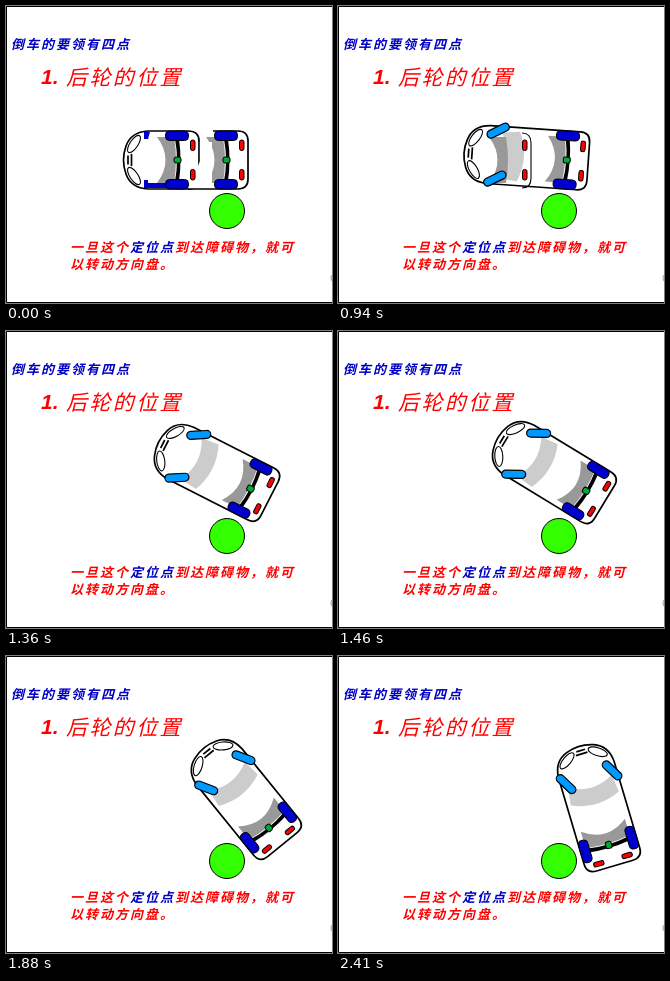
These frames come from a looping animation (326 by 297 pixels, 5410 ms). An HTML page:

```html
<!DOCTYPE html>
<html lang="zh-CN">
<head>
<meta charset="utf-8">
<style>
html, body { margin: 0; width: 100%; height: 100%; overflow: hidden; background: #fff; }
svg { display: block; width: 326px; height: 297px; }
text { font: italic bold 13px "Noto Sans CJK SC", "Noto Sans CJK", sans-serif; letter-spacing: 2px; fill: #f00; white-space: pre; }
.blue { fill: #0000c4; }
.head { font-size: 21px; font-weight: 500; letter-spacing: 2.4px; }
.num { font: italic bold 21px "Liberation Sans", sans-serif; letter-spacing: 0; }
.body { fill: #fff; stroke: #000; stroke-width: 1.7; }
.line { fill: none; stroke: #000; stroke-width: 1.7; }
.thin { stroke-width: 1.1; }
.wheel { fill: #0000cc; stroke: #000; }
.steer { fill: #0099ff; stroke: #000; stroke-width: 1.2; }
.lamp { fill: #f00; stroke: #000; }
</style>
</head>
<body>
<svg viewBox="0 0 326 297">
  <defs>
    <g id="lamps">
      <rect class="lamp" x="13.5" y="-20" width="4.5" height="10.5" rx="2"/>
      <rect class="lamp" x="13.5" y="9.5" width="4.5" height="10.5" rx="2"/>
    </g>
    <path id="pane" d="M-20-23Q-3 0-20 23H-3Q1 0-3-23Z" fill="#999"/>
    <g id="rear">
      <use href="#pane"/>
      <path d="M-2-21Q2 0-2 21H2Q5 0 2-21Z"/>
      <rect x="-3" y="-3" width="7" height="6" rx="2" fill="#0a3" stroke="#000"/>
      <rect class="wheel" x="-11.5" y="-29" width="23" height="9.5" rx="4"/>
      <rect class="wheel" x="-11.5" y="19.5" width="23" height="9.5" rx="4"/>
      <use href="#lamps"/>
    </g>
    <g id="nose">
      <ellipse class="body thin" rx="10" ry="4" transform="translate(-92 -16) rotate(-56)"/>
      <ellipse class="body thin" rx="10" ry="4" transform="translate(-92 16) rotate(56)"/>
      <path class="line" d="M-98-4.5V4.5M-94.5-6V6"/>
    </g>
  </defs>

  <path d="M326 .5H.5V296.5H326" fill="none" stroke="#000"/>
  <circle cx="330" cy="272" r="5" fill="none" stroke="#999"/>
  <text class="blue" x="5" y="43">倒车的要领有四点</text>
  <text class="num" x="35" y="78">1.</text>
  <text class="head" x="60" y="79">后轮的位置</text>
  <text x="64" y="246">一旦这个<tspan class="blue">定位点</tspan>到达障碍物，就可</text>
  <text x="64" y="263">以转动方向盘。</text>
  <circle cx="221" cy="205" r="17.5" fill="#3f0" stroke="#000"/>

  <g id="parked">
    <g transform="translate(220 154)">
      <path class="body" d="M-38-29Q-27-29-27-19V19Q-27 29-38 29H-78Q-95 28-100 14Q-105 0-100-14Q-95-28-78-29Z"/>
      <path class="body" d="M-13-29H12Q22-29 22-19V19Q22 29 12 29H-38"/>
      <path d="M-82-28h6l-2 7h-4zM-82 28h22v-5h-18v-3h-4z" fill="#0000cc"/>
      <use href="#nose"/>
      <use href="#rear"/>
    </g>
    <use href="#rear" x="171" y="154"/>
    <path d="M193.9 136H206V182H193.9Z" fill="#fff"/>
    <path id="glass" d="M163 131Q177 154 163 177H169Q183 154 169 131Z" fill="#ccc"/>
    <circle id="dot" cx="220" cy="178" r="4.5" fill="#ffec00" stroke="#660" stroke-width=".8"/>
  </g>

  <g class="car">
    <path class="body" d="M12-29Q22-29 22-19V19Q22 29 12 29H-78Q-95 28-100 14Q-105 0-100-14Q-95-28-78-29Z"/>
    <path d="M-66-23Q-53 0-66 23L-48 25Q-37 0-48-25Z" fill="#ccc"/>
    <use href="#nose"/>
    <use href="#rear"/>
  </g>
  <g id="trail">
    <use href="#pane" x="171" y="154"/>
    <use href="#lamps" x="171" y="154"/>
    <path class="line thin" d="M184 127Q193 127 193 137V172Q193 182 184 182"/>
  </g>
  <g class="car">
    <rect class="steer" x="-12" y="-4" width="24" height="8" rx="4" transform="translate(-70 -24.5) rotate(-30)"/>
    <rect class="steer" x="-12" y="-4" width="24" height="8" rx="4" transform="translate(-70 23.5) rotate(-30)"/>
  </g>
</svg>
<script>
const LOOP = 5410;
const steps = [0, 100, 200, 310, 420, 530, 730, 940, 1050, 1150, 1260, 1360, 1460,
  1560, 1670, 1770, 1880, 1980, 2080, 2190, 2300, 2410];
// time, rear axle x, y, heading
const poses = [
  [730, 224.5, 154, 0], [940, 228.3, 154, 4], [1360, 244, 157.5, 27],
  [1670, 255.5, 164, 40.4], [1880, 262.5, 171.5, 51], [2410, 270.5, 188.5, 73.5]
];
const $ = id => document.getElementById(id);
const cars = document.querySelectorAll(".car");
const show = (el, on) => el.setAttribute("visibility", on ? "visible" : "hidden");

function poseAt(t) {
  const i = Math.max(1, poses.findIndex(p => p[0] >= t));
  const a = poses[i - 1], b = poses[i];
  const k = Math.max(0, (t - a[0]) / (b[0] - a[0]));
  return a.map((v, j) => v + (b[j] - v) * k);
}

function draw(now) {
  const time = now % LOOP;
  const n = steps.filter(s => s <= time).length - 1;
  const t = steps[n], parked = t < 730;
  const [, x, y, angle] = poseAt(t);
  for (const car of cars) {
    car.setAttribute("transform", `translate(${x} ${y}) rotate(${angle})`);
    show(car, !parked);
  }
  show($("parked"), parked);
  show($("glass"), parked && n > 0);
  show($("dot"), parked && n % 2 === 1);
  show($("trail"), !parked && t < 1050);
}

const start = performance.now();
function tick() {
  draw(performance.now() - start);
  requestAnimationFrame(tick);
}
tick();
</script>
</body>
</html>
```
